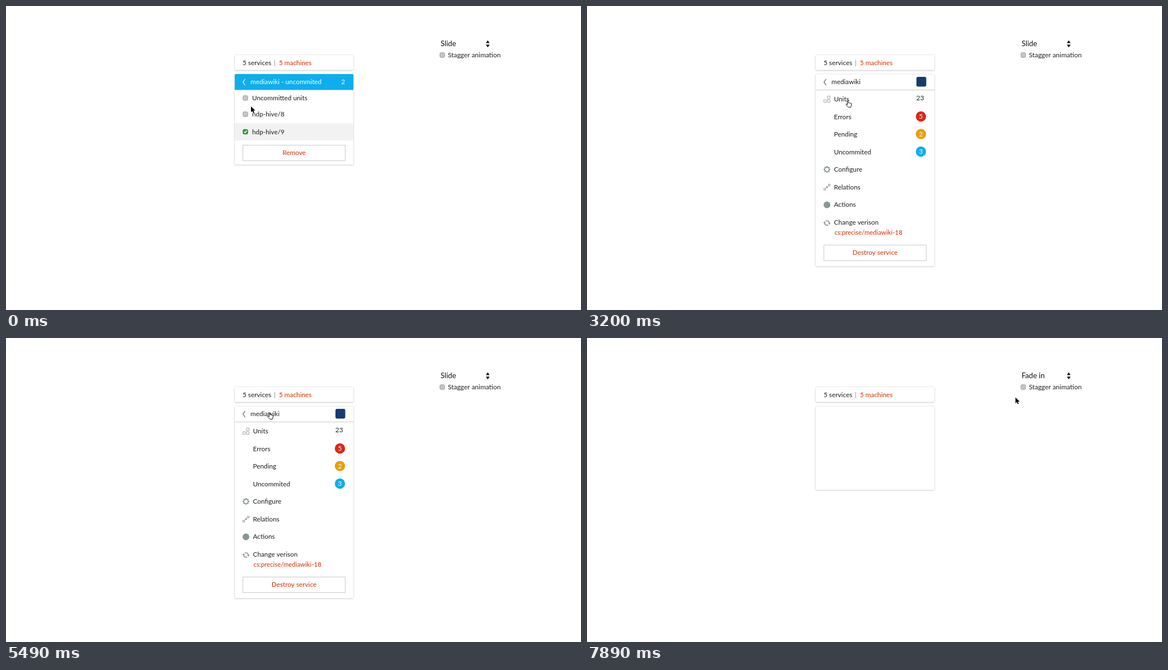
These frames come from a looping animation (1028x545 px, 7990 ms). An HTML page with a canvas:

```html
<!DOCTYPE html>
<html lang="en">
<head>
<meta charset="utf-8">
<style>
  html, body { margin: 0; width: 100%; height: 100%; overflow: hidden; background: #fff; }
  canvas { display: block; }
</style>
</head>
<body>
<canvas id="stage" width="1028" height="545"></canvas>
<script>
const ctx = document.getElementById('stage').getContext('2d');
const LOOP = 7990, STEP = 100, SLIDE = 224;
const INK = '#1e1e1e', ORANGE = '#d42e00', GREY = '#8a9696', LINE = '#c9c9c9';
const LEFT = 409, TOP = 122.5, WIDTH = 212, ROW = 30.2;

// [start time, view]
const views = [
  [-1000, 'uncommitted'], [870, 'detail'], [1570, 'list'], [2670, 'detail'],
  [4100, 'errors'], [5170, 'detail'], [5970, 'list'], [7800, 'empty']
];
// [time, x, y] of the cursor tip
const path = [
  [100, 438, 180], [600, 449, 129], [1700, 449, 129], [2300, 462, 208],
  [2600, 465, 164], [3100, 465, 164], [3700, 467, 194], [4600, 467, 194],
  [4900, 470, 133], [6200, 470, 133], [6700, 839, 65], [7200, 839, 65],
  [7300, 836, 50], [7700, 836, 50], [7900, 766, 106.5]
];
const services = [
  { count: 2, name: 'memcached', color: '#555959', icons: 580 },
  { count: 1, name: 'mediawiki', color: '#173a70', icons: 555, errors: 5 },
  { count: 1, name: 'haproxy', color: '#66686a', icons: 580 },
  { count: 2, name: 'mysql-1', color: '#1b87b8' },
  { count: 2, name: 'mysql-2', color: '#1b87b8' }
];
const heights = { uncommitted: 162, detail: 344, list: 150, errors: 297, empty: 150 };

function text(str, x, mid, color = INK, align = 'left', size = 11.8) {
  ctx.font = `${size}px Lato, sans-serif`;
  ctx.textAlign = align;
  ctx.fillStyle = color;
  ctx.fillText(str, x, mid + 4);
}
function box(x, y, w, h, r, fill, stroke) {
  ctx.beginPath();
  ctx.roundRect(x, y, w, h, r);
  if (fill) { ctx.fillStyle = fill; ctx.fill(); }
  if (stroke) { ctx.strokeStyle = stroke; ctx.lineWidth = 1; ctx.stroke(); }
}
function draw(d, stroke, fill, width = 1) {
  const shape = new Path2D(d);
  if (fill) { ctx.fillStyle = fill; ctx.fill(shape); }
  if (stroke) { ctx.strokeStyle = stroke; ctx.lineWidth = width; ctx.stroke(shape); }
}
function at(x, y, paint) {
  ctx.save();
  ctx.translate(x, y);
  paint();
  ctx.restore();
}
function dot(x, y, r, color) {
  ctx.beginPath();
  ctx.arc(x, y, r, 0, 7);
  ctx.fillStyle = color;
  ctx.fill();
}
function card(x, y, w, h, blur = 3, r = 1.5) {
  ctx.save();
  ctx.shadowColor = 'rgba(0,0,0,.28)';
  ctx.shadowBlur = blur;
  ctx.shadowOffsetY = .6;
  box(x, y, w, h, r, '#fff');
  ctx.restore();
}
function badge(n, y, color) {
  dot(597, y, 9.2, color);
  text(n, 597, y, '#fff', 'center');
}
function button(label, x, y, w, h = 28) {
  box(x + .5, y + .5, w, h, 0, null, LINE);
  text(label, x + .5 + w / 2, y + h / 2, ORANGE, 'center');
}
function checkbox(x, y, checked) {
  box(x - 4.2, y - 4.2, 8.4, 8.4, 2, checked ? '#2d9b38' : '#c6c6c6', checked ? '#25852f' : '#9c9c9c');
  if (checked) at(x, y, () => draw('M-2.3 0L-.6 1.9L2.6 -2.2', '#fff', null, 1.5));
}
function option(label, y, checked) {
  if (checked) { ctx.fillStyle = '#f2f2f2'; ctx.fillRect(LEFT, 210, WIDTH, 31); }
  checkbox(428, y, checked);
  text(label, 440, y);
}
function header(title, color, count) {
  if (color) box(LEFT, TOP - .5, WIDTH, 28.5, [1.5, 1.5, 0, 0], color);
  else {
    draw('M409 150.5H621', LINE);
    box(589, 127, 17.5, 17.5, 3, '#173a70');
  }
  const ink = color ? '#fff' : INK;
  draw('M427.5 131L423.7 136.5L427.5 142', color ? '#fff' : '#555', null, 1.2);
  text(title, 437, 136, ink);
  if (count) text(count, 606, 136, ink, 'right');
}

const positionAt = t => {
  const next = path.findIndex(p => p[0] > t);
  if (next === 0) return path[0].slice(1);
  if (next < 0) return path[path.length - 1].slice(1);
  const [a, b] = [path[next - 1], path[next]];
  const k = (t - a[0]) / (b[0] - a[0]);
  return [a[1] + (b[1] - a[1]) * k, a[2] + (b[2] - a[2]) * k];
};
const viewAt = t => views.filter(v => v[0] <= t).pop();

// The row under the cursor, once it has moved since the list opened
function hoveredRow(t) {
  const [start, name] = viewAt(t);
  const [x, y] = positionAt(t);
  if (name !== 'list' || String([x, y]) === String(positionAt(start))) return -1;
  return x > LEFT && x < LEFT + WIDTH ? Math.floor((y - TOP) / ROW) : -1;
}
function rowIcons(x, y) {
  at(x, y, () => {
    draw('M-5 0Q0 -5 5 0Q0 5 -5 0Z', '#e3e3e3', null, 1.2);
    dot(0, 0, 1.8, '#e3e3e3');
  });
  at(x + 18, y, () => {
    draw('M0 5.5L-3.3 1Q-5 -4.5 0 -4.7Q5 -4.5 3.3 1Z', '#e6e6e6', null, 1.2);
    dot(0, -1, 1.3, '#e6e6e6');
  });
}

const headers = {
  uncommitted: () => header('mediawiki - uncommited', '#0eaeee', 2),
  errors: () => header('mediawiki - errors', '#e04b43', 5),
  detail: () => header('mediawiki')
};
const bodies = {
  uncommitted() {
    option('Uncommitted units', 165);
    option('hdp-hive/8', 194);
    option('hdp-hive/9', 225.5, true);
    button('Remove', 423, 249, 183);
  },
  errors() {
    option('Start errors', 165);
    [194, 225.5, 257].forEach((y, i) => option('hdp-hive/' + (i + 1), y));
    draw('M409 273.5H621', LINE);
    option('Relation errors', 287.5);
    [317, 348.5].forEach((y, i) => option('hdp-hive/' + (i + 4), y));
    button('Resolve & retry', 423, 371, 105);
    button('Resolve', 536, 371, 70);
  },
  detail() {
    const labels = ['Units', 'Errors', 'Pending', 'Uncommited', 'Configure', 'Relations', 'Actions', 'Change verison'];
    labels.forEach((label, i) => text(label, 441.5, 167 + i * 31.57));
    text(23, 602.5, 165, INK, 'right');
    badge(5, 198, '#dd2719');
    badge(2, 229.5, '#e89f0c');
    badge(3, 261, '#0eaeee');
    at(429, 167, () => draw('M1 -5.5H5.5V-1H1ZM-5.5 1H-1V5.5H-5.5ZM1 1H5.5V5.5H1Z', '#a0a8a8'));
    at(429, 293, () => {
      draw('M4 0A4 4 0 1 1 -4 0A4 4 0 1 1 4 0', GREY, null, 1.8);
      for (let i = 0; i < 8; i++) { draw('M4.5 0H6', GREY, null, 1.8); ctx.rotate(Math.PI / 4); }
    });
    at(429, 325, () => {
      draw('M-5.5 2H-2.5V5H-5.5ZM2.5 -5.5H5.5V-2.5H2.5ZM-2.5 2L2.5 -2.5', GREY);
      dot(0, -.3, 1.6, GREY);
    });
    dot(429, 356.5, 6, GREY);
    at(429, 389, () => {
      for (let i = 0; i < 2; i++) {
        draw('M-2.5 -3.6Q3 -5.5 4.5 .5', GREY, null, 1.6);
        draw('M2 0H6.5L4.5 3Z', null, GREY);
        ctx.rotate(Math.PI);
      }
    });
    text('cs:precise/mediawiki-18', 442.5, 405.5, ORANGE, 'left', 11.4);
    button('Destroy service', 423, 428, 183);
  },
  list(t) {
    const hovered = hoveredRow(t);
    const recent = new Set([0, 1, 2, 3, 4, 5].map(i => hoveredRow(t - i * STEP)));
    services.forEach((s, i) => {
      const y = TOP + i * ROW;
      if (i === hovered) { ctx.fillStyle = '#f2f2f2'; ctx.fillRect(LEFT, y, WIDTH, ROW); }
      box(423, y + 6.5, 17.5, 17.5, 3, s.color);
      text(s.count, 454.5, y + 14.5, '#777');
      text(s.name, 463, y + 14.5);
      if (s.icons && recent.has(i)) rowIcons(s.icons, y + 15.5);
      if (s.errors) badge(s.errors, y + 15, '#dd2719');
    });
  },
  empty() {}
};

function panel(t) {
  const [start, name] = viewAt(t);
  const left = Math.max(0, 1 - (t - start) / SLIDE);
  card(LEFT, TOP, WIDTH, heights[name]);
  ctx.save();
  ctx.beginPath();
  ctx.rect(LEFT, TOP - 1, WIDTH, heights[name] + 1);
  ctx.clip();
  if (headers[name]) headers[name]();
  at(left * left * WIDTH, 0, () => bodies[name](t));
  ctx.restore();
}
function select(t) {
  text(t < 7800 ? 'Slide' : 'Fade in', 777, 67.5, '#111', 'left', 13.2);
  draw('M858 66.5L861.3 61.5L864.6 66.5ZM858 69.3L861.3 74.3L864.6 69.3Z', null, '#111');
  checkbox(780, 88);
  text('Stagger animation', 790, 87.5, INK, 'left', 11.95);
  if (t < 6800 || t > 7800) return;
  ctx.globalAlpha = t < 7800 ? 1 : .5;
  card(763, 24, 109, 74, 6, 4);
  ['None', 'Fade in', 'Slide', 'Scale'].forEach((label, i) => {
    const y = 25.5 + i * 17.5, active = i === (t < 7300 ? 2 : 1);
    if (active) { ctx.fillStyle = '#3b83f3'; ctx.fillRect(763, y, 109, 17.5); }
    const ink = active ? '#fff' : '#111';
    text(label, 777, y + 8.7, ink, 'left', 13.2);
    if (i === 2) at(770, y + 8.7, () => draw('M-3 0L-1 3L3 -3.5', ink, null, 1.4));
  });
  ctx.globalAlpha = 1;
}
function cursor(t) {
  const [x, y] = positionAt(t);
  if (t < 400 || t > 6300) {
    const arrow = 'M0 0V10.5L2.4 8.3L4.1 12L5.9 11.2L4.3 7.6H7.6Z';
    at(x, y, () => { draw(arrow, '#fff', null, 1.6); draw(arrow, null, '#000'); });
  } else {
    at(x - 2, y, () => draw('M1.5 1Q2.5 -.4 3.4 1L4.2 5Q5 3.8 6 5Q7 4.2 7.7 5.4Q9.6 5 9.4 7' +
      'Q9.5 10 8.3 12.5H4L.4 8.8Q-1 6.5 .8 6.6L2.6 8Z', '#111', '#fff'));
  }
}

function frame() {
  const t = Math.floor((performance.now() % LOOP + 10) / STEP) * STEP;
  ctx.fillStyle = '#fff';
  ctx.fillRect(0, 0, 1028, 545);
  card(LEFT, 88, WIDTH, 26.8);
  text('5 services', 423, 101.5);
  text('|', 480.5, 101.5, '#888', 'center');
  text('5 machines', 488, 101.5, ORANGE);
  panel(t);
  select(t);
  cursor(t);
  requestAnimationFrame(frame);
}
frame();
</script>
</body>
</html>
```
